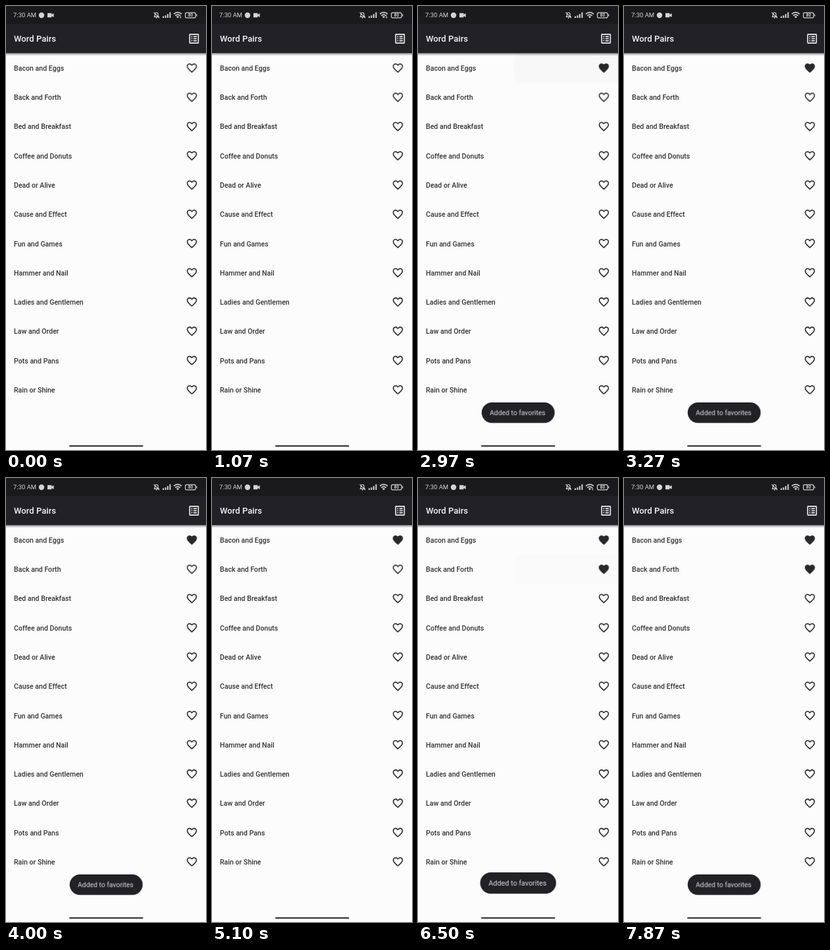
Write an HTML page that moves like this. It is 304 px wide and 672 px high and loops after 8000 ms.

```html
<!DOCTYPE html>
<html lang="en">
<head>
<meta charset="utf-8">
<title>Word Pairs</title>
<style>
  html, body { margin: 0; width: 100%; height: 100%; overflow: hidden; background: #fcfcfc; }
  svg { display: block; width: 100vw; height: 100vh; }
  text { font-family: Roboto, "Open Sans", sans-serif; }
  .row { font-size: 10.6px; font-weight: 500; fill: #343436; }
  .heart { fill: #29292c; }

  .full, .ripple, #toast, #traffic { animation: 8s linear infinite; }
  .full, #traffic { animation-timing-function: step-end; }
  #full0 { animation-name: like0; }
  #full1 { animation-name: like1; }
  #empty0 { animation: unlike0 8s step-end infinite; }
  #empty1 { animation: unlike1 8s step-end infinite; }
  @keyframes like0 { 0% { opacity: 0 } 30%, 100% { opacity: 1 } }
  @keyframes like1 { 0% { opacity: 0 } 78%, 100% { opacity: 1 } }
  @keyframes unlike0 { 0% { opacity: 1 } 30%, 100% { opacity: 0 } }
  @keyframes unlike1 { 0% { opacity: 1 } 78%, 100% { opacity: 0 } }

  .ripple { fill: #222226; opacity: 0; transform-box: fill-box; transform-origin: center; }
  #ripple0 { animation-name: ripple0; }
  #ripple1 { animation-name: ripple1; }
  @keyframes ripple0 {
    0%, 29.5% { opacity: 0; transform: scale(.1) }
    31% { opacity: .05 }
    37% { opacity: .02; transform: scale(1) }
    39%, 100% { opacity: 0; transform: scale(1.2) }
  }
  @keyframes ripple1 {
    0%, 77% { opacity: 0; transform: scale(.1) }
    78% { opacity: .05 }
    81.25% { opacity: .008; transform: scale(1) }
    83%, 100% { opacity: 0; transform: scale(1.2) }
  }

  #toast { opacity: 0; transform-origin: 152.5px 615.5px; animation-name: toast; }
  @keyframes toast {
    0%, 30.4% { opacity: 0; transform: translateY(34px) scale(.8); animation-timing-function: ease-out }
    33.15% { opacity: 1; transform: translateY(-2.5px) scale(1.04); animation-timing-function: ease-in-out }
    36.9%, 56.5% { opacity: 1; transform: none; animation-timing-function: ease-in }
    60% { opacity: 0; transform: translateY(8px) scale(.9); animation-timing-function: step-end }
    78.5% { opacity: 0; transform: translateY(34px) scale(.8); animation-timing-function: ease-out }
    81.25% { opacity: 1; transform: translateY(-2.5px) scale(1.04); animation-timing-function: ease-in-out }
    85%, 100% { opacity: 1; transform: none }
  }

  #traffic { animation-name: traffic; }
  @keyframes traffic { 0%, 71%, 100% { opacity: 1 } 32% { opacity: 0 } }
</style>
</head>
<body>
<svg viewBox="0 0 304 672" preserveAspectRatio="none">
  <defs>
    <path id="solid" d="M12 21.35l-1.45-1.32C5.4 15.36 2 12.28 2 8.5 2 5.42 4.42 3 7.5 3c1.74 0 3.41.81 4.5 2.09C13.09 3.81 14.76 3 16.5 3 19.58 3 22 5.42 22 8.5c0 3.78-3.4 6.86-8.55 11.54L12 21.35z"/>
    <path id="outline" d="M16.5 3c-1.74 0-3.41.81-4.5 2.09C10.91 3.81 9.24 3 7.5 3 4.42 3 2 5.42 2 8.5c0 3.78 3.4 6.86 8.55 11.54L12 21.35l1.45-1.32C18.6 15.36 22 12.28 22 8.5 22 5.42 19.58 3 16.5 3zm-4.4 15.55l-.1.1-.1-.1C7.14 14.24 4 11.39 4 8.5 4 6.5 5.5 5 7.5 5c1.54 0 3.04.99 3.57 2.36h1.87C13.46 5.99 14.96 5 16.5 5c2 0 3.5 1.5 3.5 3.5 0 2.89-3.14 5.74-7.9 10.05z"/>
    <linearGradient id="shade" x2="0" y2="1">
      <stop stop-color="#222226" stop-opacity=".5"/>
      <stop offset="1" stop-color="#222226" stop-opacity="0"/>
    </linearGradient>
    <clipPath id="body"><rect y="71" width="304" height="601"/></clipPath>
  </defs>

  <rect width="304" height="672" fill="#fcfcfc"/>
  <g id="list" clip-path="url(#body)"></g>

  <rect y="71" width="304" height="4.5" fill="url(#shade)"/>
  <rect width="304" height="71.3" fill="#222226"/>
  <rect width="304" height="27" fill="#1a1a1d"/>

  <g fill="#d4d4d6">
    <text x="11" y="17.4" font-size="9.5">7:30 AM</text>
    <circle cx="54" cy="14" r="4.2"/>
    <path d="M63 10.8h6.4v2.3l3.2-2v5.8l-3.2-2v2.3H63z"/>
    <path d="M238 15.5h2v2.5h-2zM241.4 14.2h2v3.8h-2zM244.8 12.2h2v5.8h-2zM248.4 9.6h2v8.4h-2z"/>
    <g fill="none" stroke="#d4d4d6" stroke-width="1.2">
      <path d="M225.5 16.3h6.6l-1-1.4v-2.3a2.4 2.6 0 0 0-4.8 0v2.3zM227.8 18.2h2M224.6 9.6l8.4 8.6"/>
      <path d="M255 12.2q6-5 12 0M257.2 14.7q3.8-3.2 7.6 0" stroke-width="1.7"/>
      <rect x="272.6" y="10.1" width="15.6" height="7.8" rx="2.2"/>
    </g>
    <path d="M258.8 16q2.2-1.7 4.4 0l-2.2 2.6zM289.2 12.4h1.2v3.2h-1.2z"/>
    <path id="traffic" d="M264 16.2l1.3-1.8 1.3 1.8zM264 17l1.3 1.8 1.3-1.8z"/>
    <text x="280.4" y="16.4" font-size="6.4" font-weight="700" text-anchor="middle">80</text>
  </g>

  <text x="12" y="54" font-size="13.1" font-weight="500" fill="#f4f4f4">Word Pairs</text>
  <g fill="none" stroke="#eeeeee" stroke-width="1.6">
    <rect x="279.2" y="42.9" width="13.2" height="13.2" rx=".6"/>
    <path d="M281.6 46.4h1.6M281.6 49.5h1.6M281.6 52.6h1.6M284.8 46.4h5.2M284.8 49.5h5.2M284.8 52.6h5.2"/>
  </g>

  <rect x="96" y="664.8" width="112.5" height="2.2" rx="1.1" fill="#3a3a3d"/>

  <g id="toast">
    <rect x="96.7" y="600" width="111" height="31" rx="15.5" fill="#222226"/>
    <text x="109" y="619.4" font-size="10.4" fill="#dcdcde">Added to favorites</text>
  </g>
</svg>
<script>
  const pairs = ["Bacon and Eggs", "Back and Forth", "Bed and Breakfast", "Coffee and Donuts",
    "Dead or Alive", "Cause and Effect", "Fun and Games", "Hammer and Nail",
    "Ladies and Gentlemen", "Law and Order", "Pots and Pans", "Rain or Shine"];
  const pitch = 44.27, liked = 2;

  const row = (name, i) => {
    const y = 94 + i * pitch;
    const place = `class="heart" transform="translate(273.2 ${y - 9.4}) scale(.775)"`;
    const ripple = i < liked ? `<svg y="${y - 22}" width="304" height="${pitch}" style="width:304px;height:${pitch}px">
      <circle id="ripple${i}" class="ripple" cx="283" cy="22" r="135"/></svg>` : "";
    const full = i < liked ? `<g id="full${i}" class="full"><use href="#solid" ${place}/></g>` : "";
    return `${ripple}<text class="row" x="12" y="${y + 3.9}">${name}</text>
      <g id="empty${i}"><use href="#outline" ${place}/></g>${full}`;
  };
  document.getElementById("list").innerHTML = pairs.map(row).join("");
</script>
</body>
</html>
```
